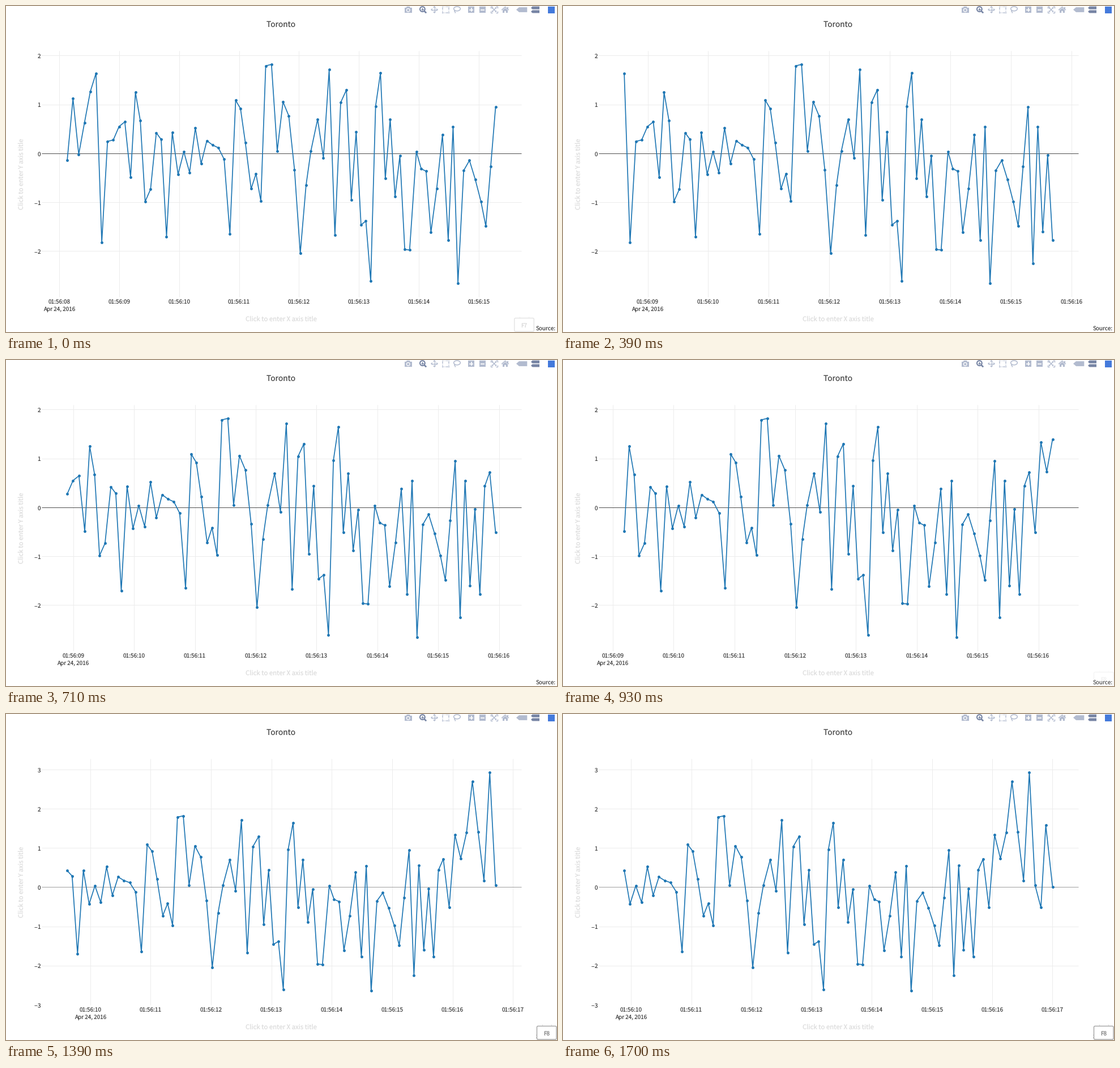
A matplotlib script that plays this animation: 973 px wide and 575 px high, repeating every 1.94 s.

```python
import numpy as np
import matplotlib.pyplot as plt
from matplotlib.animation import FuncAnimation
from matplotlib.patches import Circle, Ellipse, FancyBboxPatch, Polygon, Rectangle

W, H, DPI = 973, 575, 100
PT = 72 / DPI                       # points per pixel
STEP, LOOP = 10, 1940               # ms
LEFT, RIGHT, TOP, BOTTOM = 62.5, 910, 79, 513
X_FIRST, X_LAST = 108.1, 864.5      # outermost samples of the window
Y_HIGH, Y_LOW = 103, 488.5          # largest and smallest sample
WINDOW = 80

INK, GRID, GHOST, BLUE = "#444444", "#ececec", "#dcdcdc", "#1f77b4"
PALE, DARK = "#b2bbcf", "#7684a4"

VALUES = np.array([
    -.14, 1.12, -.02, .63, 1.26, 1.64, -1.82, .245, .275, .55,
    .645, -.485, 1.25, .67, -.985, -.735, .42, .285, -1.70, .43,
    -.43, .035, -.39, .52, -.21, .26, .17, .115, -.12, -1.65,
    1.085, .915, .215, -.725, -.415, -.975, 1.79, 1.82, .05, 1.055,
    .77, -.335, -2.045, -.655, .05, .70, -.09, 1.71, -1.67, 1.04,
    1.30, -.95, .44, -1.46, -1.385, -2.61, .965, 1.645, -.515, .70,
    -.885, -.045, -1.965, -1.975, .035, -.315, -.365, -1.615, -.725, .38,
    -1.77, .545, -2.65, -.35, -.145, -.53, -.985, -1.49, -.27, .945,
    -2.25, .55, -1.605, -.035, -1.78, .435, .72, -.515, 1.335, .73,
    1.395, 2.70, 1.41, .17, 2.93, .045, -.52, 1.58, .005])


def sample_times():
    """Seconds after 01:56:00 at which each sample arrived."""
    gaps = np.full(len(VALUES) - 1, .0961)
    gaps[[11, 12, 13, 16, 30, 31, 33, 34, 35, 43]] = .0811
    gaps[[*range(50, 63), 64, 65, 66, 70, 71, *range(76, 86), 96]] = .0811
    gaps[[14, 17]] = .0898
    gaps[[44, 63, 97]] = .1125
    return 8.1323 + np.concatenate([[0], np.cumsum(gaps)])


TIMES = sample_times()

# When the window slides (ms), and the first sample it then holds.
SLIDES = np.array([0, 70, 160, 310, 390, 540, 710, 810,
                   930, 1080, 1160, 1280, 1390, 1560, 1700])
FIRSTS = [0, 1, 2, 3, 5, 6, 8, 9, 11, 12, 13, 14, 16, 17, 19]

plt.rcParams["font.family"] = "Noto Sans CJK JP"
plt.rcParams["text.hinting"] = "none"
plt.rcParams["toolbar"] = "None"

fig = plt.figure(figsize=(W / DPI, H / DPI), dpi=DPI, facecolor="white")
ax = fig.add_axes([0, 0, 1, 1])
ax.set_xlim(0, W)
ax.set_ylim(H, 0)
ax.axis("off")


def text(x, y, s, px, color=INK, ha="center", **kw):
    kw.setdefault("va", "baseline")
    return ax.text(x, y, s, fontsize=px * PT, color=color, ha=ha, **kw)


def line(xs, ys, color, px, **kw):
    kw.setdefault("solid_capstyle", "butt")
    return ax.plot(xs, ys, color=color, lw=px * PT, **kw)[0]


def fill(points, color):
    ax.add_patch(Polygon(points, fc=color, ec="none"))


def box(x, y, w, h, color):
    ax.add_patch(Rectangle((x, y), w, h, fc=color, ec="none"))


def toolbar():
    # camera
    box(703.5, 3, 13.5, 9, PALE)
    fill([(706.5, 3), (707.8, 1), (712.7, 1), (714, 3)], PALE)
    ax.add_patch(Circle((710.2, 7.3), 2.8, fc=PALE, ec="white", lw=1.3 * PT))
    # zoom
    line([738.5, 742.2], [8.8, 12.3], DARK, 2.6)
    ax.add_patch(Circle((735.4, 5.6), 4.4, fc="white", ec=DARK, lw=2 * PT))
    line([733, 737.8], [5.6, 5.6], DARK, 1.4)
    line([735.4, 735.4], [3.2, 8], DARK, 1.4)
    # pan
    line([752, 761], [6.5, 6.5], PALE, 1.4)
    line([756.5, 756.5], [2, 11], PALE, 1.4)
    for dx, dy in [(1, 0), (-1, 0), (0, 1), (0, -1)]:
        tip = np.array([756.5 + 6.5 * dx, 6.5 + 6.5 * dy])
        back, side = np.array([dx, dy]) * 2.8, np.array([dy, dx]) * 2.6
        fill([tip, tip - back + side, tip - back - side], PALE)
    # box select
    for k in range(5):
        for x, y in [(770 + 2.75 * k, .5), (770 + 2.75 * k, 11.2),
                     (770, .5 + 2.68 * k), (781, .5 + 2.68 * k)]:
            box(x, y, 1.6, 1.6, PALE)
    # lasso
    ax.add_patch(Ellipse((796.5, 4.9), 11.6, 7.6, fc="none", ec=PALE, lw=1.5 * PT))
    line([792.3, 791.8, 793.4, 793.2], [7.6, 9.4, 10.6, 12.6], PALE, 1.4)
    # zoom in and out
    for x in (815.8, 835.6):
        box(x, 1, 11.6, 11.2, PALE)
        line([x + 2.4, x + 9.2], [6.6, 6.6], "white", 1.7)
    line([821.6, 821.6], [3.2, 10], "white", 1.7)
    # autoscale
    for sx in (-1, 1):
        for sy in (-1, 1):
            cx, cy = 862 + 6 * sx, 6.5 + 5.6 * sy
            line([cx - 3 * sx, cx, cx], [cy, cy, cy - 3 * sy], PALE, 1.3)
            line([862, 862 + 3.2 * sx], [6.5, 6.5 + 3.2 * sy], PALE, 1.4)
            ex, ey = 862 + 4.2 * sx, 6.5 + 4.2 * sy
            fill([(ex, ey), (ex - 3 * sx, ey), (ex, ey - 3 * sy)], PALE)
    # home
    line([875.2, 881.5, 887.8], [7.2, 1.7, 7.2], PALE, 1.6)
    box(885, 1.6, 1.6, 3.6, PALE)
    fill([(877, 7.4), (881.5, 3.6), (886, 7.4), (886, 12), (882.8, 12),
          (882.8, 8.8), (880.2, 8.8), (880.2, 12), (877, 12)], PALE)
    # hover modes
    fill([(901, 6.5), (906, 2.2), (920.3, 2.2), (920.3, 10.9), (906, 10.9)], PALE)
    for y in (.8, 7.4):
        fill([(927, y + 2.5), (929.6, y), (942, y), (942, y + 5), (929.6, y + 5)], DARK)
    box(956.5, .5, 12, 12, "#447adb")


def key_cap(x, label):
    """Key overlay whose left edge is at x; returns its artists."""
    cap = FancyBboxPatch((x, 550.5), 34.5, 23.5, fc="white", ec="#a4a4a4",
                         lw=1.4 * PT, zorder=8,
                         boxstyle="round,pad=0,rounding_size=2")
    ax.add_patch(cap)
    ticks = [line([x + dx] * 2, [546.5, 550], "#dddddd", 1, zorder=7)
             for dx in (9, 25.5)]
    return [cap, *ticks, text(x + 17.3, 566.6, label, 10, "#777777", zorder=9)]


def segments(verticals, horizontals):
    """One broken path of full-length grid lines."""
    xs, ys = [], []
    for x in verticals:
        xs += [x, x, np.nan]
        ys += [TOP, BOTTOM, np.nan]
    for y in horizontals:
        xs += [LEFT, RIGHT, np.nan]
        ys += [y, y, np.nan]
    return xs, ys


toolbar()
text(486, 37.2, "Toronto", 13.75)
text(486.2, 556, "Click to enter X axis title", 11.35, GHOST)
text(27.5, 296, "Click to enter Y axis title", 11.35, GHOST,
     va="center", rotation=90)
text(935.3, 572, "Source:", 9.9, ha="left")

grid = line([], [], GRID, 1, zorder=1, snap=True)
zero = line([], [], INK, 1, zorder=2, snap=True)
trace = line([], [], BLUE, 1.7, zorder=4, marker="o", ms=4.9 * PT, mew=0,
             solid_joinstyle="round")
minus = line([], [], INK, .9, zorder=3)
x_labels = [text(0, 525.2, "", 10.05) for _ in range(9)]
y_labels = [text(61.2, 0, "", 10.05, ha="right") for _ in range(7)]
date = text(0, 537.8, "Apr 24, 2016", 9.9)
key_out, key_in = key_cap(897.8, "F7"), key_cap(937.5, "F8")


def place(labels, items):
    """Show items (x, y, string) with the pooled labels, hide the rest."""
    for i, label in enumerate(labels):
        label.set_visible(i < len(items))
        if i < len(items):
            x, y, s = items[i]
            label.set_position((x, y))
            label.set_text(s)


def fade(artists, alpha):
    for a in artists:
        a.set_alpha(alpha)
        a.set_visible(alpha > 0)


def update(n):
    step = np.searchsorted(SLIDES, n * STEP, side="right") - 1
    first, now = FIRSTS[step], SLIDES[step]
    t = TIMES[first:first + WINDOW]
    v = VALUES[first:first + WINDOW]
    kx = (X_LAST - X_FIRST) / (t[-1] - t[0])
    ky = (Y_LOW - Y_HIGH) / (v.max() - v.min())

    def to_x(s):
        return X_FIRST + (s - t[0]) * kx

    def to_y(u):
        return Y_HIGH + (v.max() - u) * ky

    trace.set_data(to_x(t), to_y(v))

    secs = [s for s in range(7, 19) if LEFT <= to_x(s) <= RIGHT]
    units = [u for u in range(-3, 4) if TOP <= to_y(u) <= BOTTOM]
    place(x_labels, [(to_x(s), 525.2, f"01:56:{s:02d}") for s in secs])
    place(y_labels, [(61.2, to_y(u) + 4.7, str(abs(u))) for u in units])
    date.set_x(to_x(secs[0]))

    grid.set_data(*segments(
        [to_x(s) for s in secs if LEFT + 1 < to_x(s) < RIGHT - 1],
        [to_y(u) for u in units if u and TOP + 1 < to_y(u) < BOTTOM - 1]))
    zero.set_data([LEFT, RIGHT], [to_y(0)] * 2)
    zero.set_color("#505050" if v.max() < 2 else
                   "#858585" if v.max() < 2.8 else "#a0a0a0")

    mx, my = [], []
    for u in units:
        if u < 0:
            mx += [50.4, 55, np.nan]
            my += [to_y(u) + 1.3] * 2 + [np.nan]
    minus.set_data(mx, my)

    fade(key_out, max(0, .3 - now / 400))
    fade(key_in, float(np.clip((now - 905) / 230, 0, 1)))
    return []


anim = FuncAnimation(fig, update, frames=LOOP // STEP, interval=STEP,
                     init_func=lambda: update(0), repeat=True,
                     repeat_delay=0, blit=False)
plt.show()
```
